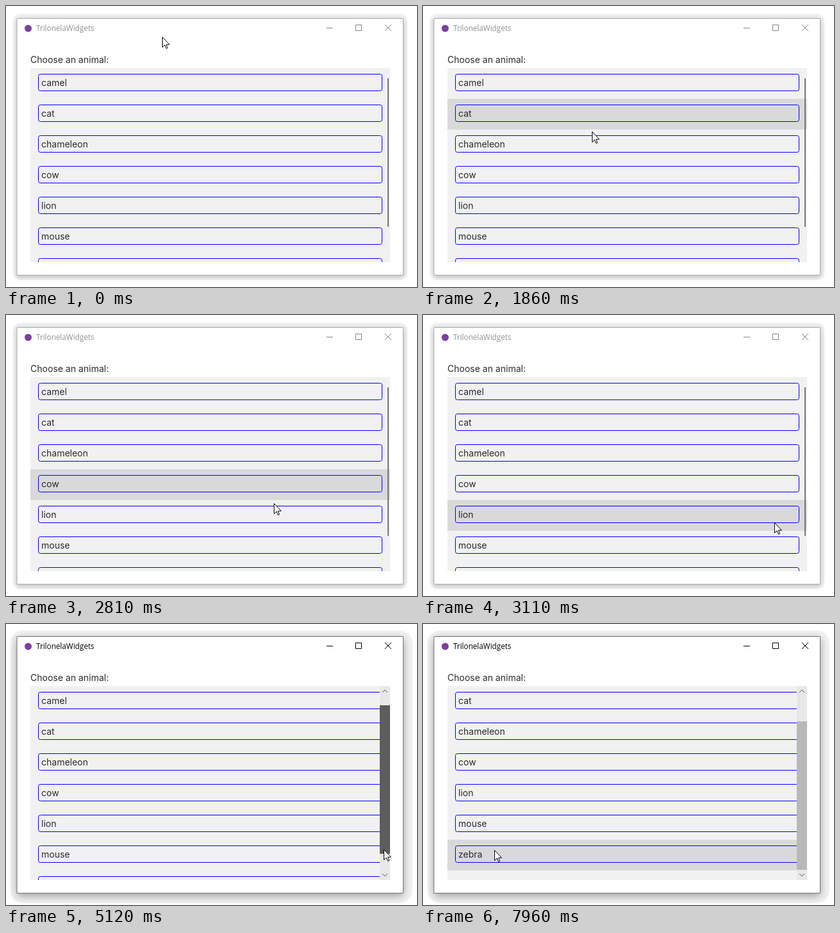
An HTML page with a canvas for the animation above (8000 ms loop, 640 by 439 pixels).

```html
<!DOCTYPE html>
<html lang="en">
<head>
<meta charset="utf-8">
<title>Animal list</title>
<style>
  html, body { margin: 0; width: 100%; height: 100%; overflow: hidden; background: #fff; }
  canvas { display: block; }
</style>
</head>
<body>
<canvas id="stage" width="640" height="439"></canvas>
<script>
const ctx = document.getElementById('stage').getContext('2d');
const LOOP = 8000, HOVER_LAG = 70;
const EXPAND = 3440, PRESS = 4660, RELEASE = 6960, LEAVE = 7260;
const LIST = { x: 38, y: 97, w: 560, h: 303, row: 48 };
const THUMB = { top: 113, height: 232, travel: 39, grabY: 338 };
const UI_FONT = '14px Inter, sans-serif', INK = '#2b2b2b';
const animals = ['camel', 'cat', 'chameleon', 'cow', 'lion', 'mouse', 'zebra'];

// The pointer rests between moves; times are in ms
const home = { x: 243, y: 48 };
const moves = [
  { from: 490, to: 1040, x: 254, y: 118 },
  { from: 1190, to: 1560, x: 259, y: 167 },
  { from: 1720, to: 1860, x: 263, y: 196 },
  { from: 1860, to: 2090, x: 272, y: 215 },
  { from: 2240, to: 2810, x: 417, y: 294 },
  { from: 2810, to: 3220, x: 594, y: 335 },
  { from: 4250, to: 4470, x: 589, y: 334 },
  { from: 4640, to: 5890, x: 587, y: 380 },
  { from: 7190, to: 7960, x: 111, y: 353 }
];

const clamp = (v, lo, hi) => Math.min(hi, Math.max(lo, v));
const progress = (t, from, to) => clamp((t - from) / (to - from), 0, 1);

function pointerAt(t) {
  let { x, y } = home;
  for (const move of moves) {
    const k = progress(t, move.from, move.to);
    x += (move.x - x) * k;
    y += (move.y - y) * k;
  }
  return { x: Math.round(x), y: Math.round(y) };
}

function rect(x, y, w, h, color) {
  ctx.fillStyle = color;
  ctx.fillRect(x, y, w, h);
}

function text(str, x, y, font, color) {
  ctx.font = font;
  ctx.fillStyle = color;
  ctx.fillText(str, x, y);
}

function roundRect(x, y, w, h, r) {
  ctx.beginPath();
  ctx.roundRect(x, y, w, h, r);
}

function stroke(path, x, y, color) {
  ctx.save();
  ctx.translate(x, y);
  ctx.strokeStyle = color;
  ctx.stroke(new Path2D(path));
  ctx.restore();
}

function drawWindow(active) {
  rect(0, 0, 640, 439, '#fff');
  ctx.fillStyle = '#f3f3f3';
  if (active) roundRect(7, 10, 626, 426, 20);
  else roundRect(11, 12, 614, 416, 11);
  ctx.fill();

  ctx.save();
  ctx.shadowColor = `rgba(0,0,0,${active ? 0.36 : 0.25})`;
  ctx.shadowBlur = active ? 13 : 8;
  ctx.shadowOffsetY = active ? 4 : 2;
  rect(17, 19, 602, 402, '#fff');
  ctx.restore();
  stroke('M0 0H601V401H-.5V0', 17.5, 19.5, active ? '#707070' : '#aaa');

  ctx.fillStyle = '#7b3f9f';
  ctx.beginPath();
  ctx.arc(34.5, 35, 5.5, 0, Math.PI * 2);
  ctx.fill();
  text('TrilonelaWidgets', 47, 39, '11.7px "Open Sans", sans-serif', active ? '#000' : '#929299');

  const ink = active ? '#000' : '#858585';
  stroke('M0 0H10', 499, 34.5, ink);
  stroke('M0 0H9V9H0Z', 544.5, 29.5, ink);
  stroke('M0 0L10 10M10 0L0 10', 590, 29, ink);
  text('Choose an animal:', LIST.x, 89, UI_FONT, INK);
}

function drawList(firstItem, hoverRow) {
  ctx.save();
  ctx.beginPath();
  ctx.rect(LIST.x, LIST.y, LIST.w, LIST.h);
  ctx.clip();
  rect(LIST.x, LIST.y, LIST.w, LIST.h, '#f1f1f1');
  animals.slice(firstItem).forEach((name, i) => {
    const y = LIST.y + i * LIST.row;
    if (i === hoverRow) rect(LIST.x, y, LIST.w, LIST.row, '#d9d9d9');
    roundRect(50.5, y + 9.5, 535, 26, 3);
    ctx.strokeStyle = '#00f';
    ctx.stroke();
    text(name, 55, y + 28, UI_FONT, INK);
  });
  ctx.restore();
}

function thumbColor(t) {
  if (t < EXPAND) return '#747474';
  if (t >= LEAVE) return '#b8b8b8';
  return t >= PRESS && t < RELEASE ? '#5d5d5d' : '#8a8a8a';
}

function drawScrollbar(t, offset) {
  const open = progress(t, EXPAND, EXPAND + 280);
  ctx.globalAlpha = open;
  rect(582, LIST.y, 16, LIST.h, 'rgba(232,232,232,.94)');
  stroke('M-4 4L0 0L4 4', 590, 103, '#555');
  stroke('M-4 -4L0 0L4 -4', 590, 394, '#555');
  ctx.globalAlpha = 1;
  rect(594 - 12 * open, THUMB.top + offset, 2 + 14 * open, THUMB.height, thumbColor(t));
}

const arrow = new Path2D('M.5 .5V16.5L4.2 13L6.7 18.5L8.7 17.6L6.5 12.2H11.5Z');

function drawPointer({ x, y }) {
  ctx.save();
  ctx.translate(x, y);
  ctx.fillStyle = '#fff';
  ctx.fill(arrow);
  ctx.strokeStyle = '#000';
  ctx.stroke(arrow);
  ctx.restore();
}

function draw(t) {
  const drag = pointerAt(Math.min(t, RELEASE)).y - THUMB.grabY;
  const offset = t < PRESS ? 0 : clamp(drag, 0, THUMB.travel);
  const hover = pointerAt(t - HOVER_LAG);
  const hoverRow = hover.x < 582 ? Math.floor((hover.y - LIST.y) / LIST.row) : -1;

  drawWindow(t >= PRESS);
  drawList(Math.floor(offset / THUMB.travel), hoverRow);
  drawScrollbar(t, offset);
  drawPointer(pointerAt(t));
}

const start = performance.now();
function tick() {
  draw((performance.now() - start) % LOOP);
  requestAnimationFrame(tick);
}
tick();
</script>
</body>
</html>
```
